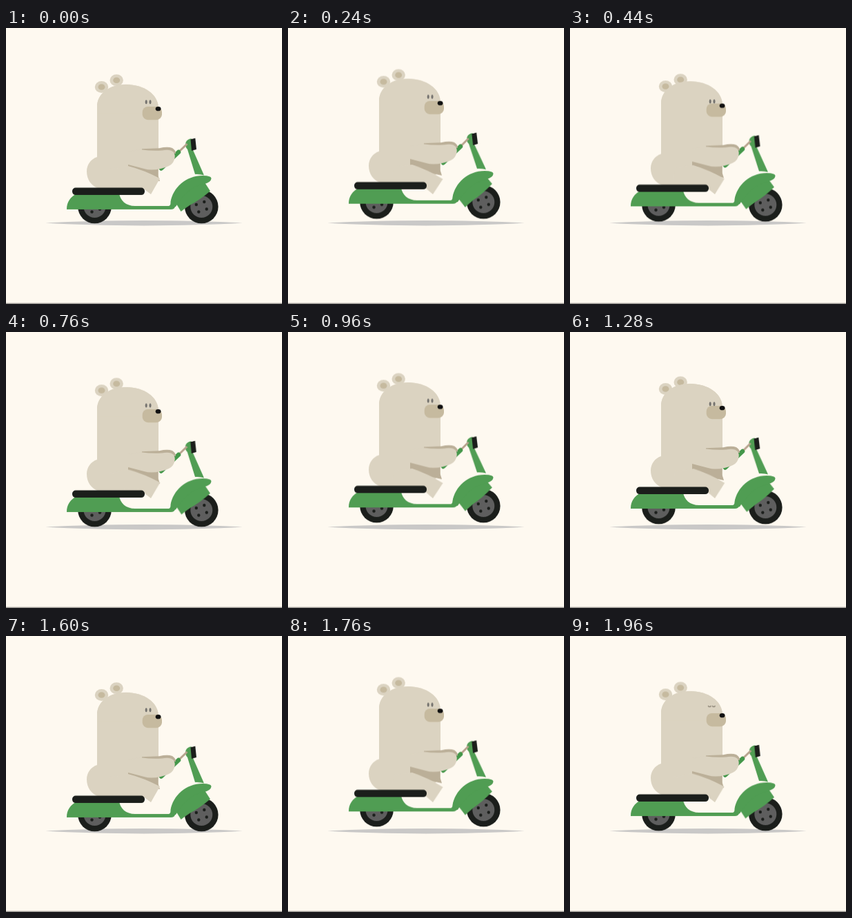
These frames come from a looping animation (400 by 400 pixels, 2 s). An HTML page without scripts:

```html
<!DOCTYPE html>
<html lang="en">
<head>
<meta charset="utf-8">
<title>Bear on a scooter</title>
<style>
  html, body { margin: 0; width: 100%; height: 100%; overflow: hidden; background: #fef9f0; }
  svg { display: block; width: 100vw; height: 100vh; }

  .green { fill: #509d53; }
  .black { fill: #1b1e1b; }
  .fur { fill: #dbd3c1; }
  .tan { fill: #c6ba9f; }
  .shade { fill: #bbaf98; }

  /* every part bounces on the same 400 ms beat */
  .ride, .face, .wheel, .wing, .fender, .column, .leg { animation: 400ms infinite; }
  .ride { animation-name: ride; }
  .face { animation-name: face; }
  .wheel { animation-name: wheel; }
  .wing { animation-name: wing; }
  .fender { animation-name: fender; transform-origin: 274px 250px; }
  .column { animation-name: column; transform-origin: 280px 212px; }
  .leg { animation-name: leg; transform-origin: 210px 241px; }

  @keyframes ride {
    0%, 100% { transform: translateY(0); animation-timing-function: cubic-bezier(.215, .61, .355, 1); }
    50% { transform: translateY(-8.8px); animation-timing-function: cubic-bezier(.45, 0, .75, .8); }
  }
  @keyframes face {
    0%, 100% { transform: translateY(0); animation-timing-function: cubic-bezier(.37, 0, .63, 1); }
    50% { transform: translateY(-8.4px); animation-timing-function: cubic-bezier(.37, 0, .63, 1); }
  }
  @keyframes wheel {
    0%, 100% { transform: translateY(0); animation-timing-function: cubic-bezier(.25, .46, .45, .94); }
    50% { transform: translateY(-7.2px); animation-timing-function: cubic-bezier(.45, 0, .6, .9); }
  }
  @keyframes wing {
    0%, 100% { transform: translateY(0); animation-timing-function: cubic-bezier(.215, .61, .355, 1); }
    50% { transform: translateY(1.5px); animation-timing-function: cubic-bezier(.45, 0, .75, .8); }
  }
  @keyframes fender {
    0%, 100% { transform: none; animation-timing-function: cubic-bezier(.215, .61, .355, 1); }
    50% { transform: translateX(1.5px) rotate(-6.5deg); animation-timing-function: cubic-bezier(.45, 0, .75, .8); }
  }
  @keyframes column {
    0%, 100% { transform: rotate(0); animation-timing-function: cubic-bezier(.215, .61, .355, 1); }
    50% { transform: rotate(-1.4deg); animation-timing-function: cubic-bezier(.45, 0, .75, .8); }
  }
  @keyframes leg {
    0%, 100% { transform: rotate(0); animation-timing-function: cubic-bezier(.215, .61, .355, 1); }
    50% { transform: rotate(4deg); animation-timing-function: cubic-bezier(.45, 0, .75, .8); }
  }

  .open { animation: open 2s step-end infinite; }
  .shut { animation: shut 2s step-end infinite; }
  @keyframes open { 0% { opacity: 1; } 96% { opacity: 0; } }
  @keyframes shut { 0% { opacity: 0; } 96% { opacity: 1; } }
</style>
</head>
<body>
<svg viewBox="0 0 400 400">
  <defs>
    <g id="tyre">
      <circle class="black" r="24.3"/>
      <circle r="16" fill="#5e5e5e"/>
      <g class="black">
        <circle cx="-7.5" cy="-3" r="2.2"/>
        <circle cx="4" cy="-7" r="2.2"/>
        <circle cx="7.5" cy="3.5" r="2.2"/>
        <circle cx="-4" cy="7.5" r="2.2"/>
      </g>
    </g>
    <g id="ear">
      <ellipse class="fur" rx="9.7" ry="8.4"/>
      <ellipse class="tan" rx="5" ry="4.3"/>
    </g>
  </defs>

  <rect width="400" height="400" fill="#fef9f0"/>
  <rect y="398.6" width="400" height="1.4" fill="#969490"/>
  <path d="M57 282.6Q120 279 200 279T343 282.6Q280 286.4 200 286.4T57 282.6Z" fill="#c9c8c7"/>

  <g class="wheel">
    <use href="#tyre" x="128.5" y="259"/>
    <use href="#tyre" x="283.3" y="259"/>
  </g>

  <!-- scooter shell -->
  <g class="ride">
    <path class="green fender" d="M245 252L253.500 266Q260 261 267 256.500Q280 250 296 236.500L288 224L262 228Z"/>
    <path class="green" d="M88 263C88 252 93 245 104 239H164C165 250 174 258 187 258H236Q239 257 239.500 250L256 240Q246 252 245 259Q244 263 239 263Z"/>
    <path class="green wing" d="M238.500 252C242 232 260 214 285 214Q298 214 297.500 218.500Q297 223 288 226Q272 229 262 239Q252 249 246 259Q238 261 238.500 252Z"/>
  </g>

  <!-- torso and head -->
  <g class="ride">
    <path class="fur" d="M132 187V114C132 95 150 82 174 82C200 82 221 96 221 117V215L200 233H135C123 229 117 219 117 208C117 198 123 190 132 187Z"/>
    <path class="shade" d="M177 190L220.500 198V214L223 222L177 212Z"/>
  </g>
  <path class="fur leg" d="M150 232V205L177 200Q200 206 223 218L210 241L200 233.500L186 226Z"/>

  <g class="ride">
    <rect class="black" x="96" y="231.500" width="105" height="10.600" rx="5"/>
    <g class="column">
      <path class="green" d="M263 176Q259 172 260.500 166Q263 160.500 269 160.500L271 177L287 213.500Q281 211.500 274 212Z"/>
      <path class="black" d="M267.500 161.500L274.300 159.800L276 176L269 178Z"/>
      <path d="M249 181L262.500 168" stroke="#b7a28d" stroke-width="3"/>
    </g>
    <path d="M225 203.500L250 180" stroke="#44974a" stroke-width="6.500" stroke-linecap="round"/>
    <path class="shade" d="M197 175.200Q210 175 222 174.300Q234 171.500 241 174Q246 177 246 182L215 184L197 177Z"/>
    <path class="fur" d="M177 198V180L197 176.500Q212 178.500 226 177.500Q238 175 243 180Q247 187 242 195Q238 201 224 204Q210 207 200 204Z"/>
  </g>

  <g class="face">
    <use href="#ear" x="138.500" y="85.500"/>
    <use href="#ear" x="160.200" y="75.700"/>
  </g>
  <!-- crown covers the roots of the ears -->
  <g class="ride">
    <path class="fur" d="M132 125V114C132 95 150 82 174 82C200 82 221 96 221 117V125Z"/>
    <rect class="tan" x="197.700" y="114" width="28.300" height="19.200" rx="8"/>
    <ellipse cx="220.600" cy="117.200" rx="3.900" ry="3.100" fill="#111"/>
  </g>
  <g class="face">
    <g class="open" fill="#75736f">
      <ellipse cx="203.200" cy="107.200" rx="1.500" ry="3"/>
      <ellipse cx="209" cy="107.200" rx="1.500" ry="3"/>
    </g>
    <path class="shut" d="M200 102q2.300 2.600 4.600 0M206 102q2.300 2.600 4.600 0" fill="none" stroke="#8b8375" stroke-width="1.300"/>
  </g>
</svg>
</body>
</html>
```
